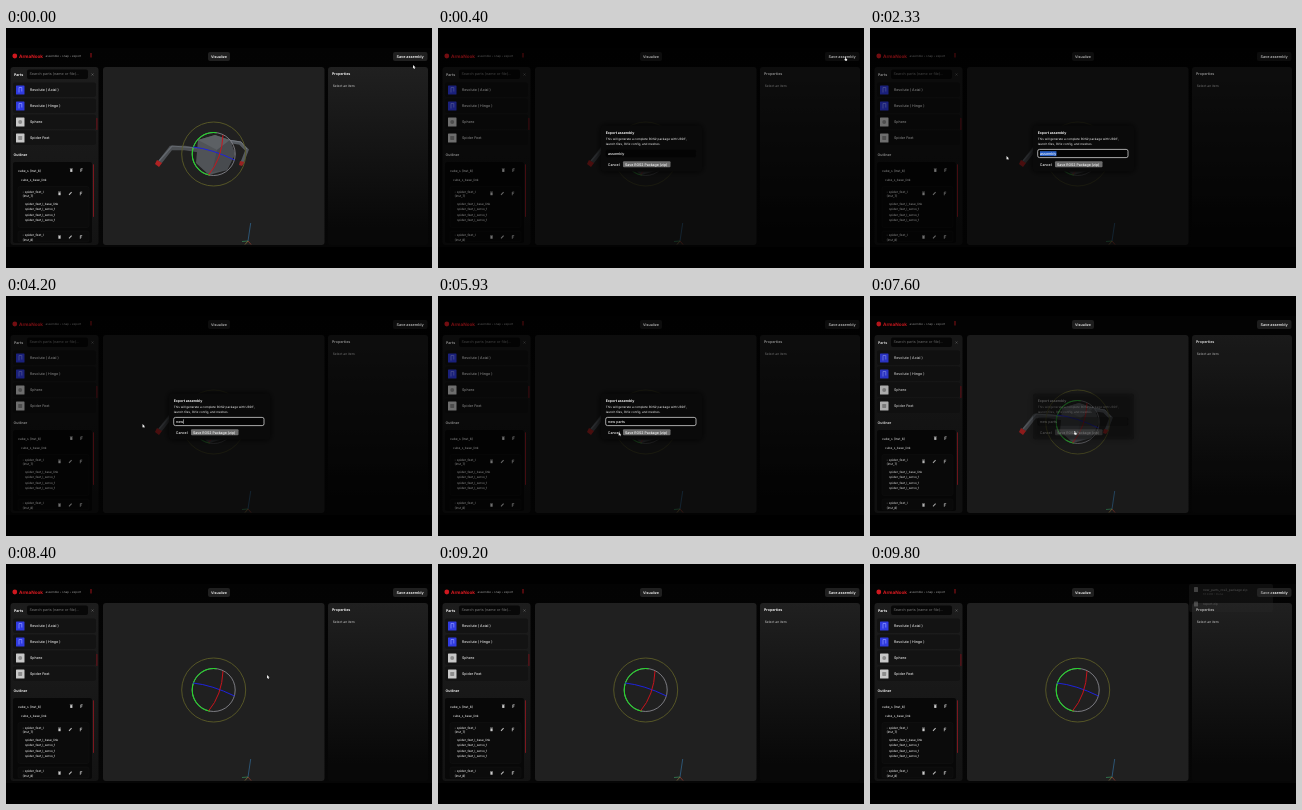
Write an HTML page with a canvas that moves like this. It is 426 by 240 pixels and loops after 9.87 s.

```html
<!DOCTYPE html>
<html lang="en">
<head>
<meta charset="utf-8">
<title>Export assembly</title>
<style>
html, body { margin: 0; width: 100%; height: 100%; overflow: hidden; background: #000; }
canvas { display: block; width: 426px; height: 240px; }
</style>
</head>
<body>
<canvas id="stage"></canvas>
<script>
const W = 426, H = 240, LOOP = 9870;
const canvas = document.getElementById('stage');
const ratio = window.devicePixelRatio || 1;
canvas.width = W * ratio;
canvas.height = H * ratio;
const c = canvas.getContext('2d');
const TAU = Math.PI * 2;
const clamp = v => Math.max(0, Math.min(1, v));
const ramp = (t, a, b) => clamp((t - a) / (b - a));
const ease = p => p * p * (3 - 2 * p);

function box(x, y, w, h, r, fill, stroke, line = 0.5) {
  c.beginPath();
  c.roundRect(x, y, w, h, r);
  if (fill) { c.fillStyle = fill; c.fill(); }
  if (stroke) { c.strokeStyle = stroke; c.lineWidth = line; c.stroke(); }
}

function text(s, x, y, size, color = '#e4e4e4', weight = 500) {
  c.font = `${weight} ${size}px Inter, "Open Sans", sans-serif`;
  c.fillStyle = color;
  c.fillText(s, x, y);
}

function line(points, color, width = 0.8) {
  c.beginPath();
  points.forEach(([x, y], i) => i ? c.lineTo(x, y) : c.moveTo(x, y));
  c.strokeStyle = color;
  c.lineWidth = width;
  c.stroke();
}

function shape(points, color) {
  c.beginPath();
  points.forEach(([x, y]) => c.lineTo(x, y));
  c.closePath();
  c.fillStyle = color;
  c.fill();
}

function ring(x, y, r, color, width, from = 0, to = TAU) {
  c.beginPath();
  c.arc(x, y, r, from, to);
  c.strokeStyle = color;
  c.lineWidth = width;
  c.stroke();
}

function curve(x0, y0, cx, cy, x1, y1, color) {
  c.beginPath();
  c.moveTo(x0, y0);
  c.quadraticCurveTo(cx, cy, x1, y1);
  c.strokeStyle = color;
  c.lineWidth = 1;
  c.stroke();
}

function fade(y0, y1, top, bottom) {
  const g = c.createLinearGradient(0, y0, 0, y1);
  g.addColorStop(0, top);
  g.addColorStop(1, bottom);
  return g;
}

function veil(alpha) {
  if (alpha <= 0) return;
  c.fillStyle = `rgba(0,0,0,${alpha})`;
  c.fillRect(0, 0, W, H);
}

function panels() {
  c.fillStyle = '#000';
  c.fillRect(0, 0, W, H);
  c.fillStyle = fade(20, 219, '#030303', '#060606');
  c.fillRect(0, 20, W, 199);
  box(4.5, 39, 88, 178, 3, fade(39, 217, '#1d1d1d', '#131313'));
  box(97, 39, 221.5, 178, 3, '#202020');
  box(322, 39, 100, 178, 3, fade(39, 200, '#202020', '#080808'));
  for (let i = 0; i < 4; i++) box(7, 54.5 + i * 16, 83, 14.5, 2, '#131313');
  box(21, 41.5, 61, 9.5, 2, '#080808');
  box(7, 134, 79, 81, 2, '#080808');
  box(12, 158.5, 71, 41, 2, '#0b0b0b', '#191919', 0.4);
  box(12, 203, 71, 11, 2, '#0b0b0b', '#191919', 0.4);
}

function robot() {
  line([[192, 122], [179, 120], [165, 120], [154, 134]], '#4c4f53', 4.4);
  line([[191, 120], [166, 118], [153, 133]], '#656a70', 1.2);
  line([[221, 113], [234, 115], [241, 122], [236, 135]], '#555a60', 3.4);
  line([[222, 112], [235, 114], [241, 121]], '#747980', 1);
  shape([[234, 133], [239, 134], [236, 138], [233, 137]], '#982222');
  shape([[192, 112], [209, 107], [224, 112], [229, 126], [221, 142], [203, 147], [190, 135]], '#505357');
  shape([[192, 112], [209, 107], [224, 112], [211, 122]], '#5c6064');
  shape([[211, 122], [224, 112], [229, 126], [221, 142], [206, 144]], '#484b4f');
  shape([[151, 132], [156, 135], [153, 139], [149, 136]], '#b02222');
}

function gizmo() {
  ring(207.7, 126, 32, '#5c5c28', 0.9);
  ring(207.7, 126, 21.5, '#85858c', 0.9);
  ring(207.7, 126, 21.5, '#25d52c', 1.1, 1.75, 4.85);
  curve(187, 119, 206, 121, 228.5, 132, '#1e22dc');
  curve(217, 107, 216, 131, 202.5, 147, '#c8141c');
}

function axes() {
  line([[242, 213], [244.7, 195]], '#336c98', 0.7);
  line([[236, 213.5], [242, 213]], '#38905c', 0.7);
  line([[242, 213], [245, 216.5]], '#a04030', 0.7);
  line([[239, 216.5], [242, 213]], '#907840', 0.7);
}

function trash(x, y) {
  c.fillStyle = '#ccc';
  c.fillRect(x - 1.1, y - 1.1, 2.2, 2.8);
  c.fillRect(x - 1.5, y - 1.8, 3, 0.4);
}

function link(x, y) {
  line([[x - 1.3, y + 1.3], [x + 1.3, y - 1.3]], '#bbb', 1.1);
}

function flag(x, y) {
  line([[x - 0.7, y + 1.8], [x - 0.7, y - 1.4], [x + 1.2, y - 1.4]], '#ccc', 0.7);
  line([[x - 0.7, y], [x + 0.8, y]], '#ccc', 0.6);
}

function labels() {
  c.beginPath();
  c.arc(8.8, 28, 2.4, 0, TAU);
  c.fillStyle = '#d0181f';
  c.fill();
  text('ArmaNook', 13, 29.8, 4.6, '#e01b22', 700);
  text('assemble • snap • export', 39.5, 29.4, 2.95, '#888');
  line([[85, 25], [85, 29.5]], '#b0161c', 0.9);

  text('Parts', 8, 47.6, 3.6, '#eee', 700);
  text('Search parts (name or file)...', 23.5, 47.3, 3.7, '#777', 400);
  line([[85.5, 45.5], [87.5, 47.5]], '#777', 0.5);
  line([[87.5, 45.5], [85.5, 47.5]], '#777', 0.5);

  ['Revolute ( Axial )', 'Revolute ( Hinge )', 'Sphere', 'Spider Feet'].forEach((name, i) => {
    const y = 57.5 + i * 16;
    box(10, y, 8.5, 9, 0.6, i < 2 ? '#303be0' : '#c8c8c8');
    if (i < 2) line([[13, y + 7], [13, y + 2], [15.8, y + 2], [15.8, y + 6]], '#8690ff', 0.8);
    else box(12.2, y + 2.4, 4, 4, i === 2 ? 2 : 0.6, '#8c8c8c');
    text(name, 24, y + 5.8, 3.6);
  });
  box(90.4, 90, 1, 12, 0.5, '#701018');

  text('Outliner', 7.5, 128.2, 3.5, '#eee', 700);
  box(87, 136, 0.9, 53, 0.4, '#881820');
  text('cube_s (Inst_6)', 12, 143.6, 3.2);
  trash(65.3, 142.2);
  flag(75.5, 142.2);
  text('cube_s_base_link', 15, 153.4, 3.05);
  [[164.5, 7], [208, 8]].forEach(([y, n]) => {
    text('- spider_feet_l', 16.5, y, 3.1);
    text(`(Inst_${n})`, 16.5, y + 4.6, 3.1);
    trash(53.5, y + 1);
    link(64.3, y + 1);
    flag(75, y + 1);
  });
  text('spider_feet_l_base_link', 19, 177, 3);
  for (let i = 0; i < 3; i++) text('spider_feet_l_servo_1', 19, 182.4 + i * 5.3, 3);

  text('Properties', 326, 46.6, 3.6, '#eee', 700);
  text('Select an item', 326.7, 58.6, 3.25, '#b4b4b4');
}

function buttons(dim) {
  c.globalAlpha = 1 - dim * 0.3;
  box(202, 24, 22, 9, 2, dim > 0.5 ? '#121212' : '#202020');
  box(387, 24, 34.5, 9, 2, dim > 0.5 ? '#121212' : '#202020');
  text('Visualize', 205, 29.9, 3.6, '#f2f2f2', 600);
  text('Save assembly', 390.5, 29.5, 3.75, '#f2f2f2', 600);
  c.globalAlpha = 1;
}

// Moment at which each character of the new name is typed
const KEYS = [3500, 3930, 4130, 4600, 4730, 4870, 5130, 5200, 5530];
const NAME = 'new parts';
const FOCUS = 1270, BLUR = 7200;

function dialog(t, alpha) {
  c.globalAlpha = alpha;
  c.shadowColor = '#000';
  c.shadowBlur = 7 * ratio;
  box(163, 97.5, 101, 46, 2.5, '#0a0a0a');
  c.shadowBlur = 0;
  c.shadowColor = 'transparent';
  text('Export assembly', 167.7, 105.6, 3.5, '#f4f4f4', 700);
  text('This will generate a complete ROS2 package with URDF,', 167.7, 112.2, 3.02, '#d4d4d4');
  text('launch files, RViz config, and meshes.', 167.7, 116.6, 3.02, '#d4d4d4');

  const typed = KEYS.filter(k => t >= k).length;
  const value = typed ? NAME.slice(0, typed) : 'assembly';
  const focused = t >= FOCUS && t < BLUR;
  box(167.7, 121.4, 90.3, 8.2, 1.8, '#040404', focused ? '#ddd' : '#0c0c0c', focused ? 0.75 : 0.4);
  c.font = '500 3.6px Inter, "Open Sans", sans-serif';
  const width = c.measureText(value).width;
  if (!typed) {
    const part = ramp(t, 1500, 1730) * width;
    c.fillStyle = '#2860c8';
    c.fillRect(170 + width - part, 123.2, part, 4.9);
  }
  text(value, 170, 126.8, 3.6, '#f4f4f4');
  if (focused && typed && t % 1000 < 650) {
    c.fillStyle = '#eee';
    c.fillRect(170.3 + width, 123.3, 0.5, 4.6);
  }

  text('Cancel', 169.8, 137.5, 3.55, '#f0f0f0');
  box(185, 133.2, 47.5, 6, 1, '#6c6c6c');
  text('Save ROS2 Package (zip)', 187, 137.5, 3.5, '#f8f8f8');
  c.globalAlpha = 1;
}

function downloads(alpha) {
  if (alpha <= 0) return;
  c.globalAlpha = alpha;
  box(319, 20, 84, 28, 2, '#2a2a2a');
  box(324, 23, 4, 5, 0.6, '#aaa');
  text('new_parts_ros2_package.zip', 333, 26.6, 3.2, '#ccc');
  text('12.4 KB • Done', 333, 31, 2.8, '#888');
  box(324, 37.5, 4, 5, 0.6, '#aaa');
  text('report.zip', 333, 41, 3.2, '#bbb');
  c.globalAlpha = 1;
}

// Pointer stops: time, x, y
const PATH = [
  [0, 407, 37], [270, 407, 29], [480, 407, 29], [1070, 256, 126],
  [1330, 187, 126], [1500, 187, 126], [1730, 146, 128], [1930, 136.5, 128],
  [5530, 136.5, 128], [6130, 196, 139], [6930, 204.5, 135],
  [7600, 204.5, 135], [8130, 261, 111], [8450, 261, 111], [9150, 414, 18]
];

const ARROW = [[0, 0], [0, 3.6], [0.8, 2.9], [1.5, 4.1], [2, 3.8], [1.5, 2.6], [2.6, 2.5]];
const HAND = [[0, 0], [0.7, 0], [0.7, 1.5], [2.2, 1.9], [2, 3.8], [0.2, 3.8], [-0.8, 2.2], [0, 2.2]];
const inside = (x, y, l, t, r, b) => x > l && x < r && y > t && y < b;

function pointer(t) {
  const i = PATH.findIndex(p => p[0] > t);
  if (i < 0) return;
  const [t0, x0, y0] = PATH[i - 1], [t1, x1, y1] = PATH[i];
  const p = ease(ramp(t, t0, t1));
  const x = x0 + (x1 - x0) * p, y = y0 + (y1 - y0) * p;
  if (y < 21) return;
  const hand = inside(x, y, 387, 24, 421, 33) || inside(x, y, 185, 133, 233, 140);
  shape((hand ? HAND : ARROW).map(([dx, dy]) => [x + dx, y + dy]), '#eee');
}

function draw(t) {
  const open = ramp(t, 270, 400) * (1 - ramp(t, 7460, 7660));
  c.setTransform(ratio, 0, 0, ratio, 0, 0);
  c.textRendering = 'geometricPrecision';
  panels();
  if (t < 7700) robot();
  c.globalAlpha = 1 - open * 0.45;
  gizmo();
  c.globalAlpha = 1;
  axes();
  veil(open * 0.25);
  labels();
  veil(open * 0.45);
  buttons(open);
  if (open > 0) dialog(t, open);
  downloads(0.32 * ramp(t, 9600, 9800));
  pointer(t);
}

const start = performance.now();
function tick() {
  draw((performance.now() - start) % LOOP);
  requestAnimationFrame(tick);
}
tick();
</script>
</body>
</html>
```
